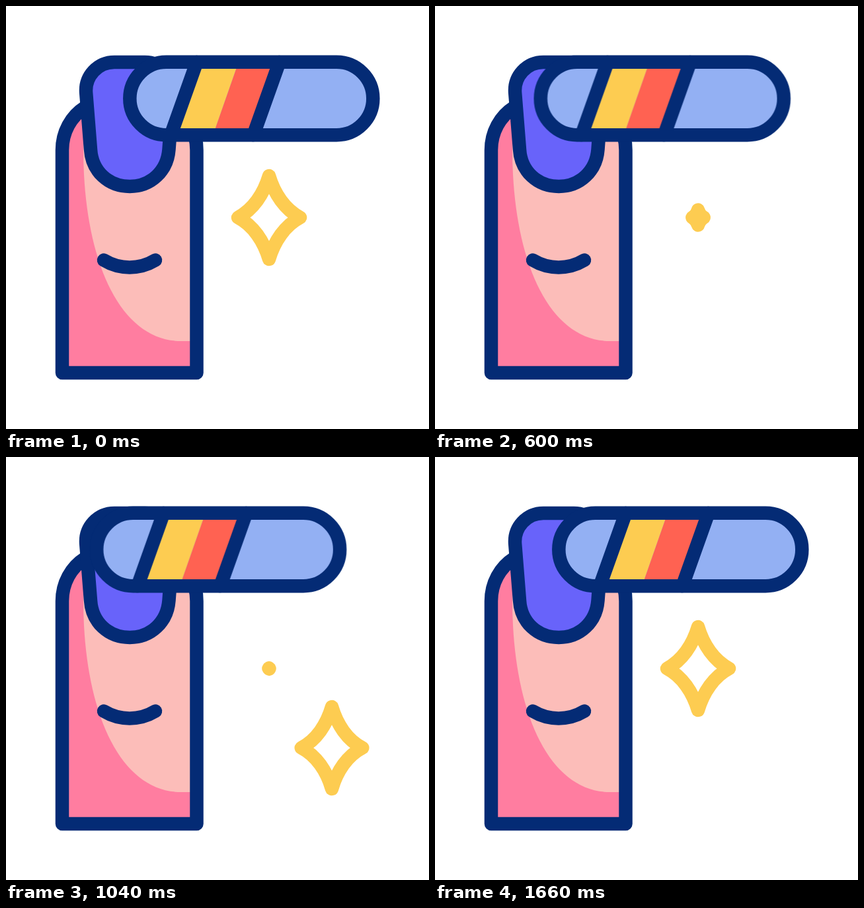
Recreate the animation shown at these times as an HTML page. Size 640 px wide and 640 px high, loop 2.4 s.

```html
<!DOCTYPE html>
<html lang="en">
<head>
<meta charset="utf-8">
<title>Nail file</title>
<style>
  html, body { margin: 0; width: 100%; height: 100%; overflow: hidden; background: #fff; }
  svg { display: block; width: 100vw; height: 100vh; }

  .line {
    stroke: #042b75;
    stroke-width: 20.5;
    stroke-linecap: round;
    stroke-linejoin: round;
  }
  .star {
    fill: none;
    stroke: #fdcc51;
    stroke-width: 20.5;
    stroke-linecap: round;
    stroke-linejoin: round;
  }

  .file  { animation: file 2400ms infinite; }
  .near  { animation: near 2400ms infinite; }
  .far   { animation: far 2400ms infinite; }

  /* Strokes of the file: left, right, far left, back to rest */
  @keyframes file {
    0%     { transform: translateX(0); animation-timing-function: cubic-bezier(.333, 0, .69, 1); }
    17.36% { transform: translateX(-86px); animation-timing-function: cubic-bezier(.333, 0, .667, 1); }
    34.72% { transform: translateX(55.2px); animation-timing-function: cubic-bezier(.26, 0, .77, 1); }
    52.08% { transform: translateX(-163px); animation-timing-function: cubic-bezier(.333, 0, .53, 1); }
    69.45%, 100% { transform: translateX(0); }
  }

  /* The stars change size while their line weight stays the same */
  @keyframes near {
    0%, 3.33% {
      d: path("M0-63C-8-36-24-12-47 0C-24 12-8 36 0 63C8 36 24 12 47 0C24-12 8-36 0-63Z");
      opacity: 1;
      animation-timing-function: cubic-bezier(.333, 0, .667, 1);
    }
    20%, 52.08% {
      d: path("M0-86C-10.9-49.1-32.8-16.4-64.2 0C-32.8 16.4-10.9 49.1 0 86C10.9 49.1 32.8 16.4 64.2 0C32.8-16.4 10.9-49.1 0-86Z");
      opacity: 1;
    }
    20% { animation-timing-function: cubic-bezier(.333, 0, .667, 1); }
    52.08% { animation-timing-function: cubic-bezier(.333, 0, .53, 1); }
    28.75%, 28.76%, 42.99%, 43% {
      d: path("M0-.2C0-.1-.1 0-.2 0C-.1 0 0 .1 0 .2C0 .1 .1 0 .2 0C.1 0 0-.1 0-.2Z");
      animation-timing-function: cubic-bezier(.333, 0, .667, 1);
    }
    28.75%, 43% { opacity: 1; }
    28.76%, 42.99% { opacity: 0; }
    69.45%, 100% {
      d: path("M0-63C-8-36-24-12-47 0C-24 12-8 36 0 63C8 36 24 12 47 0C24-12 8-36 0-63Z");
      opacity: 1;
    }
  }
  @keyframes far {
    0%, 34.7%, 34.71%, 55.55%, 55.56%, 100% {
      d: path("M0-.2C0-.1-.1 0-.2 0C-.1 0 0 .1 0 .2C0 .1 .1 0 .2 0C.1 0 0-.1 0-.2Z");
    }
    0%, 34.7%, 55.56%, 100% { opacity: 0; }
    34.71% { opacity: 1; animation-timing-function: cubic-bezier(.245, 0, .817, 1); }
    45.42% {
      d: path("M0-63.4C-8-36-24-12-47.3 0C-24 12-8 36 0 63.4C8 36 24 12 47.3 0C24-12 8-36 0-63.4Z");
      opacity: 1;
      animation-timing-function: cubic-bezier(.333, 0, .667, 1);
    }
    55.55% { opacity: 1; }
  }
</style>
</head>
<body>
<svg viewBox="0 0 640 640">
  <!-- finger -->
  <path fill="#ff7da0" d="M120 153C98 167 85 191 85 218V555H288.5V218C288.5 191 276 167 254 153Z"/>
  <path fill="#fcbdb9" d="M117 155V217C117 380 170 507 265 507H288V218C288 191 276 167 254 153Z"/>
  <path class="line" fill="none" d="M120 153C98 167 85 191 85 218V555H288.5V218C288.5 191 276 167 254 153"/>
  <path class="line" fill="none" d="M148 384.5C172 399 202 399 226 384.5"/>

  <!-- nail -->
  <path class="line" fill="#6863fa" d="M121.2 132C119 106 139 85 164 85H210C235 85 255 106 252.8 132L246.5 217C244 250 219 273 187.3 273C155 273 130 250 128 217Z"/>

  <path class="star near" transform="translate(398 320)" d="M0 0"/>
  <path class="star far" transform="translate(493 440)" d="M0 0"/>

  <!-- nail file -->
  <g class="file">
    <rect x="187.3" y="84.8" width="368" height="110.4" rx="55.2" fill="#93b0f3"/>
    <path fill="#fdcc51" d="M288.6 85H351.8L313.3 195H249.4Z"/>
    <path fill="#ff6252" d="M351.8 85H413.6L374.4 195H313.3Z"/>
    <path class="line" fill="none" d="M288.6 85L249.4 195M413.6 85L374.4 195"/>
    <rect class="line" x="187.3" y="84.8" width="368" height="110.4" rx="55.2" fill="none"/>
  </g>
</svg>
</body>
</html>
```
